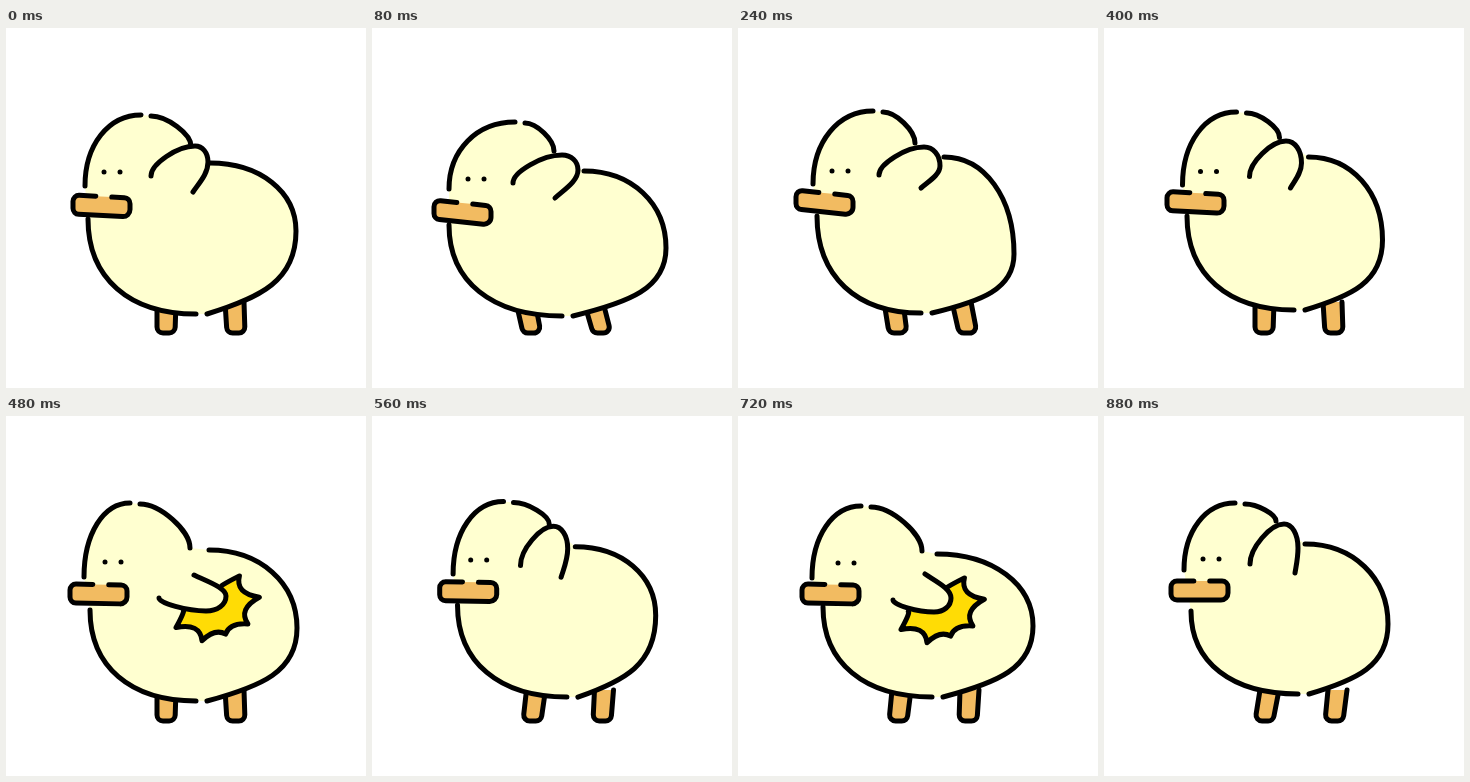
Animation of 360x360 px, one loop 0.96 s. Source, as an HTML page with a canvas:

```html
<!DOCTYPE html>
<html lang="en">
<head>
<meta charset="utf-8">
<title>Flapping chick</title>
<style>
  html, body { margin: 0; width: 100%; height: 100%; overflow: hidden; background: #fff; }
  canvas { display: block; }
</style>
</head>
<body>
<canvas id="stage" width="360" height="360"></canvas>
<script>
const ctx = document.getElementById('stage').getContext('2d');
const CREAM = '#ffffd0', ORANGE = '#f2bb61', YELLOW = '#ffdc05', INK = '#000';
const STEP = 80;

// head: cheek, crown, nape; body: back, flank, rump, breast;
// wing: root, crest, side, end; beak: x, y, droop
const rest = {
  head: [[79, 158], [135, 87], [185, 118]],
  body: [[204, 135], [290, 203], [201, 286], [82, 191]],
  wing: [[145, 148], [189, 118], [202, 134], [187, 164]],
  beak: [67, 167, 3], eye: [98, 144], hip: 160
};
const crouch = {
  head: [[77, 161], [143, 94], [182, 123]],
  body: [[212, 143], [294, 220], [201, 288], [77, 197]],
  wing: [[141, 155], [190, 127], [206, 142], [183, 170]],
  beak: [62, 172, 6], eye: [96, 151], hip: 153
};
const stretch = {
  head: [[75, 156], [135, 83], [177, 115]],
  body: [[206, 129], [276, 226], [194, 285], [79, 188]],
  wing: [[141, 147], [186, 119], [202, 138], [183, 160]],
  beak: [58, 162, 6], eye: [94, 143], hip: 155
};
const slap = {
  head: [[78, 161], [124, 87], [184, 132]],
  body: [[203, 134], [291, 212], [201, 285], [84, 194]],
  wing: [[153, 182], [200, 195], [220, 180], [188, 159]],
  beak: [64, 168, 1], eye: [99, 146], hip: 160
};
const raise = {
  head: [[82, 158], [130, 85], [174, 104]],
  body: [[203, 129], [281, 198], [208, 279], [87, 188]],
  wing: [[150, 150], [178, 107], [193, 132], [190, 160]],
  beak: [68, 165, 0], eye: [99, 144], hip: 165
};
const lowSlap = {
  head: [[74, 162], [123, 90], [184, 135]],
  body: [[199, 138], [295, 210], [205, 281], [85, 191]],
  wing: [[155, 184], [196, 196], [213, 182], [187, 158]],
  beak: [64, 168, 1], eye: [100, 147], hip: 163
};
const tuck = {
  head: [[80, 154], [131, 87], [172, 105]],
  body: [[201, 128], [284, 208], [205, 278], [87, 195]],
  wing: [[146, 148], [180, 108], [194, 132], [191, 157]],
  beak: [67, 165, 0], eye: [99, 143], hip: 165
};

function mix(a, b, k) {
  if (typeof a === 'number') return a + (b - a) * k;
  if (Array.isArray(a)) return a.map((v, i) => mix(v, b[i], k));
  return Object.fromEntries(Object.keys(a).map(key => [key, mix(a[key], b[key], k)]));
}

const cycle = [
  rest, crouch, mix(crouch, stretch, .5), stretch,
  mix(crouch, stretch, 1.2), mix(stretch, raise, .5), slap, mix(raise, rest, .3),
  raise, lowSlap, mix(raise, tuck, .5), tuck
];

// Quarter turns: rise leaves a upright and lands on b level, fall the reverse.
const rise = ([ax, ay], [bx, by], k, tilt = 0) => path => {
  path.lineTo(ax, ay);
  path.bezierCurveTo(ax, ay + k * (by - ay), bx - k * (bx - ax), by - tilt * (by - ay), bx, by);
};
const fall = ([ax, ay], [bx, by], k, tilt = 0) => path => {
  path.lineTo(ax, ay);
  path.bezierCurveTo(ax + k * (bx - ax), ay + tilt * (by - ay), bx, by - k * (by - ay), bx, by);
};
const shift = ([x, y], dx, dy) => [x + dx, y + dy];

function trace(...parts) {
  const path = new Path2D();
  parts.forEach(part => part(path));
  return path;
}

function paint(path, fill) {
  if (fill) {
    ctx.fillStyle = fill;
    ctx.fill(path);
  }
  ctx.stroke(path);
}

const leg = (hip, foot) => path => {
  path.moveTo(hip - 9, 274);
  path.arcTo(foot - 9, 305, foot, 305, 6);
  path.arcTo(foot + 9, 305, hip + 10, 274, 6);
  path.lineTo(hip + 10, 274);
};

// The outline stays open along the top.
const beak = ([x, y, droop], w = 57, h = 19) => path => {
  const at = (u, v) => [x + u * w, y + u * droop + v * h];
  path.moveTo(...at(.4, 0));
  path.arcTo(...at(0, 0), ...at(0, 1), 6);
  path.arcTo(...at(0, 1), ...at(1, 1), 6);
  path.arcTo(...at(1, 1), ...at(1, 0), 7);
  path.arcTo(...at(1, 0), ...at(.5, 0), 6);
  path.lineTo(...at(.68, 0));
};

// Six spikes with hollow sides
const burst = ([x, y]) => path => {
  const polar = (deg, r) => {
    const a = deg * Math.PI / 180;
    return [x + r * Math.cos(a), y + r * Math.sin(a)];
  };
  path.moveTo(...polar(172, 32));
  for (let i = 0; i < 6; i++) {
    const deg = 150 - 40 * i;
    path.quadraticCurveTo(...polar(deg + 20, i ? 23 : 30),
      ...polar(deg, 38 + 7 * Math.cos(i * Math.PI / 2)));
  }
  path.quadraticCurveTo(...polar(-62, 26), ...polar(-70, 21));
};

function draw({ head, body, wing, beak: bill, eye, hip }) {
  const [cheek, crown, nape] = head, [back, flank, rump, breast] = body;
  const [root, crest, side, end] = wing;
  ctx.fillStyle = '#fff';
  ctx.fillRect(0, 0, 360, 360);
  ctx.strokeStyle = INK;
  ctx.lineWidth = 5;
  ctx.lineCap = ctx.lineJoin = 'round';

  paint(trace(leg(hip, 160)), ORANGE);
  paint(trace(leg(hip + 68, 230)), ORANGE);

  const outline = [
    [rise(cheek, crown, .58)],
    [fall(shift(crown, 10, 1), nape, .4)],
    [fall(back, flank, .58), rise(flank, rump, .6, .2)],
    [fall(shift(rump, -11, 0), breast, .62)]
  ];
  ctx.fillStyle = CREAM;
  ctx.fill(trace(...outline.flat()));
  outline.forEach(parts => paint(trace(...parts)));

  const slapping = crest[1] > side[1];
  if (slapping) paint(trace(burst(shift(side, -11, 9))), YELLOW);
  paint(trace(rise(root, crest, .4), fall(crest, side, .58), rise(side, end, .4, .3)), CREAM);
  paint(trace(beak(bill)), ORANGE);

  ctx.fillStyle = INK;
  for (const dx of [0, 16]) {
    ctx.beginPath();
    ctx.arc(eye[0] + dx, eye[1], 2.5, 0, 7);
    ctx.fill();
  }
}

const start = performance.now();
function tick() {
  const t = performance.now() - start;
  draw(cycle[Math.floor(t / STEP) % cycle.length]);
  requestAnimationFrame(tick);
}
tick();
</script>
</body>
</html>
```
